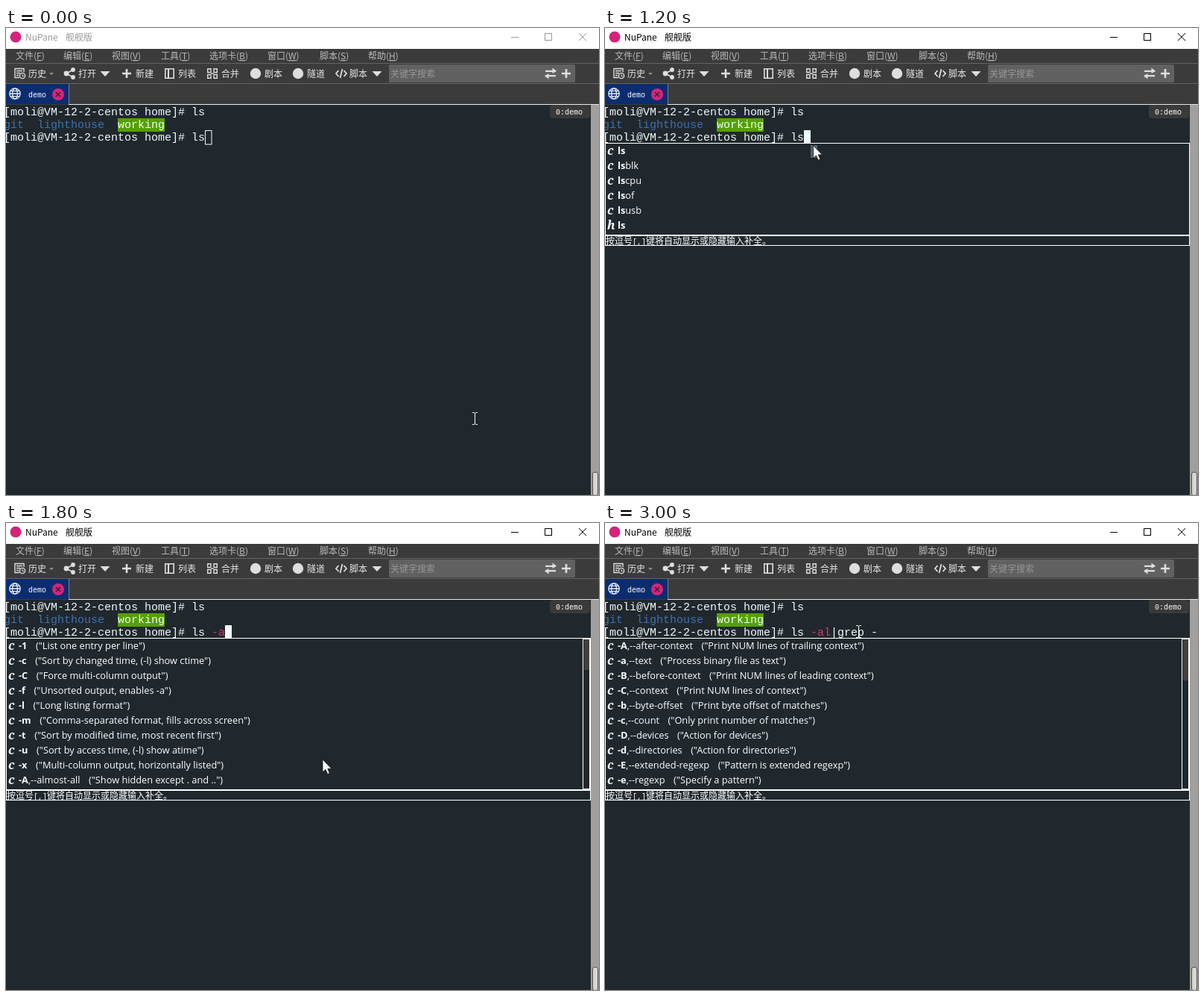
Recreate the animation shown at these times as an HTML page. Size 796 by 626 pixels, loop 3600 ms.

```html
<!DOCTYPE html>
<html lang="zh-CN">
<head>
<meta charset="utf-8">
<title>Terminal completion</title>
<style>
html, body { margin: 0; width: 100%; height: 100%; overflow: hidden; background: #20282d; }
svg { display: block; width: 796px; height: 626px; }
text { white-space: pre; }
.ui { font: 12px "Noto Sans CJK SC", "Noto Sans CJK", "Noto Sans", sans-serif; }
.term { font: 15px "Liberation Mono", "Courier New", monospace; fill: #f0fafa; }
.small { font: 10px "Liberation Mono", "Courier New", monospace; fill: #fff; }
.item { font: 12.78px "Open Sans", "Noto Sans", sans-serif; fill: #fff; }
.kind { font: italic bold 16px "Noto Serif", "Liberation Serif", serif; fill: #fff; }
.b { font-weight: 700; }
.u { text-decoration: underline; }
.line { fill: none; stroke: currentColor; }
.crisp { shape-rendering: crispEdges; }
.icons { color: #dedede; }
.title { animation: focus 3.6s step-end infinite; }
.scene { visibility: hidden; animation: show 3.6s step-end infinite; animation-delay: calc(var(--i) * .6s - 3.6s); }
@keyframes focus { 0% { color: #999 } 33.3333%, 100% { color: #000 } }
@keyframes show { 0% { visibility: visible } 16.6667%, 100% { visibility: hidden } }
</style>
</head>
<body>
<svg viewBox="0 0 796 626">
  <defs>
    <path id="arrow" d="M0 0V17L4 13.4 6.6 19.6 9.4 18.4 6.8 12.4H12Z" fill="#fff" stroke="#111" stroke-width=".8"/>
    <path id="beam" d="M-3 -7.5H-1L.5 -6.5 2 -7.5H4M.5 -6.5V7.5M-3 8.5H-1L.5 7.5 2 8.5H4" fill="none" stroke="#fff"/>
    <path id="down" d="M-6.5 -3.5H6.5L0 3.5Z" fill="#dedede"/>
    <path id="plus" d="M-6 0H6M0 -6V6" stroke="#dedede" stroke-width="2.6"/>
  </defs>

  <rect width="796" height="626" fill="#20282d"/>

  <!-- title bar -->
  <rect width="796" height="28" fill="#fff"/>
  <circle cx="13" cy="12" r="7.5" fill="#d4237a"/>
  <g class="title">
    <text class="ui" x="26" y="17" fill="currentColor">NuPane</text>
    <text class="ui" x="80" y="17" fill="currentColor">舰舰版</text>
    <path class="line crisp" d="M678 12.5H688M723.5 7.5H732.5V16.5H723.5Z"/>
    <path class="line" d="M769 7L779 17M779 7L769 17"/>
  </g>

  <!-- menu, toolbar and tab strip -->
  <rect y="28" width="796" height="75" fill="#3b3b3b"/>
  <path class="crisp" d="M0 47.5H796M0 74.5H796" stroke="#636363"/>
  <g id="menu" class="ui" fill="#bababa"></g>
  <rect x="514" y="49" width="250" height="24" rx="2" fill="#616161"/>
  <g id="tools" class="ui" fill="#e6e6e6"></g>
  <text class="ui" x="516" y="65.5" fill="#979797">关键字搜索</text>
  <g class="icons">
    <path class="line" stroke-width="1.4" d="M18 66.5H12V54.5H24V59M14 57.5H22M14 60.5H19M14 63.5H17"/>
    <circle class="line" cx="22" cy="64" r="3.6" stroke-width="1.4"/>
    <path class="line" d="M22 62V64.5H24"/>
    <path d="M58 60H64L61 63Z" fill="#909090"/>
    <path class="line" stroke-width="1.6" d="M90 56L81 61 90 66"/>
    <g fill="currentColor"><circle cx="81" cy="61" r="3.4"/><circle cx="90" cy="56" r="2.9"/><circle cx="90" cy="66" r="2.9"/></g>
    <use href="#down" x="133" y="61.5"/>
    <use href="#plus" x="162" y="61"/>
    <path class="line" stroke-width="1.6" d="M213.8 54.8H225.2V67.2H213.8Z"/>
    <path class="line" stroke-width="2" d="M218 55V67"/>
    <path class="line" stroke-width="1.4" d="M275 59.5V54.7H270.7V59.5H275M279 59.5V54.7H283.3V59.5H279M275 62.5V67.3H270.7V62.5H275M279 62.5V67.3H283.3V62.5H279M275 61H279"/>
    <circle cx="335" cy="61" r="7.2" fill="currentColor"/>
    <circle cx="392" cy="61" r="7.2" fill="currentColor"/>
    <path class="line" stroke-width="1.8" d="M446.5 57L443 61 446.5 65M453.5 57L457 61 453.5 65M451.5 55L448.5 67"/>
    <use href="#down" x="498" y="61.5"/>
    <path class="line" stroke-width="2.2" d="M724 57.8H738M738 64.2H724"/>
    <path fill="currentColor" d="M733.5 53.5L739 57.8 733.5 61ZM728.5 61L723 64.2 728.5 68.5Z"/>
    <use href="#plus" x="752" y="61"/>
  </g>

  <rect y="75" width="84" height="27" fill="#0b2d70"/>
  <path class="crisp" d="M84.5 75V102" stroke="#7d8088"/>
  <path class="crisp" d="M84 102.5H796" stroke="#e8e8e8"/>
  <g fill="none" stroke="#e8eef4" stroke-width="1.3">
    <circle cx="12" cy="88" r="7.2"/>
    <ellipse cx="12" cy="88" rx="3.4" ry="7.2"/>
    <path d="M5 88H19M6 84.3H18M6 91.7H18"/>
  </g>
  <text class="small" x="30" y="93">demo</text>
  <circle cx="70" cy="89" r="8" fill="#d4257c"/>
  <path d="M67 86L73 92M73 86L67 92" stroke="#35202c" stroke-width="1.5"/>

  <!-- terminal -->
  <g id="shell"></g>
  <rect x="730" y="103" width="54" height="18" rx="4" fill="#3a3a3a"/>
  <text class="small" x="738" y="116">0:demo</text>
  <rect x="785" y="103" width="11" height="523" fill="#a09f9d"/>
  <rect x="787.5" y="595.5" width="7" height="31" rx="2.5" fill="#d8d6d2" stroke="#55534f"/>
  <g id="scenes"></g>
</svg>

<script>
const $ = id => document.getElementById(id);
const COL = 9, ROW = 17, LEFT = -3;
const RED = '#d4386c', BLUE = '#3f70ae';

// Labels on the menu and toolbar
const menu = [[13, '文件', 'F'], [77, '编辑', 'E'], [142, '视图', 'V'], [208, '工具', 'T'],
  [273, '选项卡', 'B'], [351, '窗口', 'W'], [421, '脚本', 'S'], [486, '帮助', 'H']];
const tools = [[30, '历史'], [97, '打开'], [174, '新建'], [231, '列表'], [289, '合并'],
  [347, '剧本'], [404, '隧道'], [461, '脚本']];
$('menu').innerHTML = menu.map(([x, s, k]) =>
  `<text x="${x}" y="42">${s}(<tspan class="u">${k}</tspan>)</text>`).join('');
$('tools').innerHTML = tools.map(([x, s]) => `<text x="${x}" y="65.5">${s}</text>`).join('');

const colX = c => LEFT + c * COL;
const rect = (x, y, w, h, fill, stroke = 'none') =>
  `<rect class="crisp" x="${x}" y="${y}" width="${w}" height="${h}" fill="${fill}" stroke="${stroke}"/>`;
const term = (c, row, s, fill = '#f0fafa') =>
  `<text class="term" x="${colX(c)}" y="${117 + row * ROW}" style="fill:${fill}">${s}</text>`;
const caret = c => rect(colX(c), 137, 9, 18, '#f0ffff');
const hollow = `<rect x="267.5" y="137.5" width="8.5" height="18.5" fill="none" stroke="#f0ffff"/>`;
const pointer = (id, x, y) => `<use href="#${id}" x="${x}" y="${y}"/>`;

// One completion row: kind, matched part, remainder and description
function item(line, i) {
  const [kind, key, rest, note] = line.split('~');
  const y = 169 + i * 20;
  const desc = note ? `<tspan dx="11.5">("${note}")</tspan>` : '';
  return `<text class="kind" x="3" y="${y + 1}">${kind}</text>` +
    `<text class="item" x="17" y="${y}"><tspan class="b">${key}</tspan>${rest}${desc}</text>`;
}

function popup(lines, thumb) {
  const end = 157 + lines.length * 20;
  const bar = thumb ? rect(774.5, 155.5, 9, end - 156, 'none', '#fff') + rect(776, 156, 7, thumb, '#444040') : '';
  return rect(0.5, 154.5, 784, end - 154, '#20282d', '#fff') +
    rect(0.5, end + 1.5, 784, 13, '#20282d', '#fff') + bar + lines.map(item).join('') +
    `<text class="ui" x="1" y="${end + 12.5}" fill="#fff">按逗号<tspan class="small">[,]</tspan>键将自动显示或隐藏输入补全。</text>`;
}

const prompt = '[moli@VM-12-2-centos home]# ls';
$('shell').innerHTML = term(0, 0, prompt) + term(0, 1, 'git', BLUE) + term(5, 1, 'lighthouse', BLUE) +
  rect(150, 121, 63, 18, '#55a005') + term(17, 1, 'working') + term(0, 2, prompt);

const option = s => {
  const [flag, note] = s.split('~');
  return `c~${flag.slice(0, 2)}~${flag.slice(2)}~${note}`;
};
const commands = ['c~ls~', 'c~ls~blk', 'c~ls~cpu', 'c~ls~of', 'c~ls~usb', 'h~ls~'];
const lsOptions = [
  '-1~List one entry per line',
  '-c~Sort by changed time, (-l) show ctime',
  '-C~Force multi-column output',
  '-f~Unsorted output, enables -a',
  '-l~Long listing format',
  '-m~Comma-separated format, fills across screen',
  '-t~Sort by modified time, most recent first',
  '-u~Sort by access time, (-l) show atime',
  '-x~Multi-column output, horizontally listed',
  '-A,--almost-all~Show hidden except . and ..',
  '-b,--escape~Octal escapes for non-graphic characters'
].map(option);
const grepOptions = [
  '-A,--after-context~Print NUM lines of trailing context',
  '-a,--text~Process binary file as text',
  '-B,--before-context~Print NUM lines of leading context',
  '-C,--context~Print NUM lines of context',
  '-b,--byte-offset~Print byte offset of matches',
  '-c,--count~Only print number of matches',
  '-D,--devices~Action for devices',
  '-d,--directories~Action for directories',
  '-E,--extended-regexp~Pattern is extended regexp',
  '-e,--regexp~Specify a pattern'
].map(option);
const unused = lsOptions.filter(s => !s.startsWith('c~-l'));

const scenes = [
  hollow + pointer('beam', 629, 523),
  hollow + rect(339, 307, 9, 19, '#f0ffff'),
  caret(30) + popup(commands) + rect(276, 157, 9, 17, '#5c6266') + pointer('arrow', 279.5, 157.5),
  term(31, 2, '-a', RED) + caret(33) + popup(lsOptions.slice(0, 10), 41) + pointer('arrow', 425, 317),
  term(31, 2, '-al', RED) + popup(unused, 42) + pointer('beam', 340, 133),
  term(31, 2, '-al', RED) + term(34, 2, '|grep -') + popup(grepOptions, 55) + pointer('beam', 340, 145)
];
$('scenes').innerHTML = scenes.map((s, i) => `<g class="scene" style="--i:${i}">${s}</g>`).join('');
</script>
</body>
</html>
```
